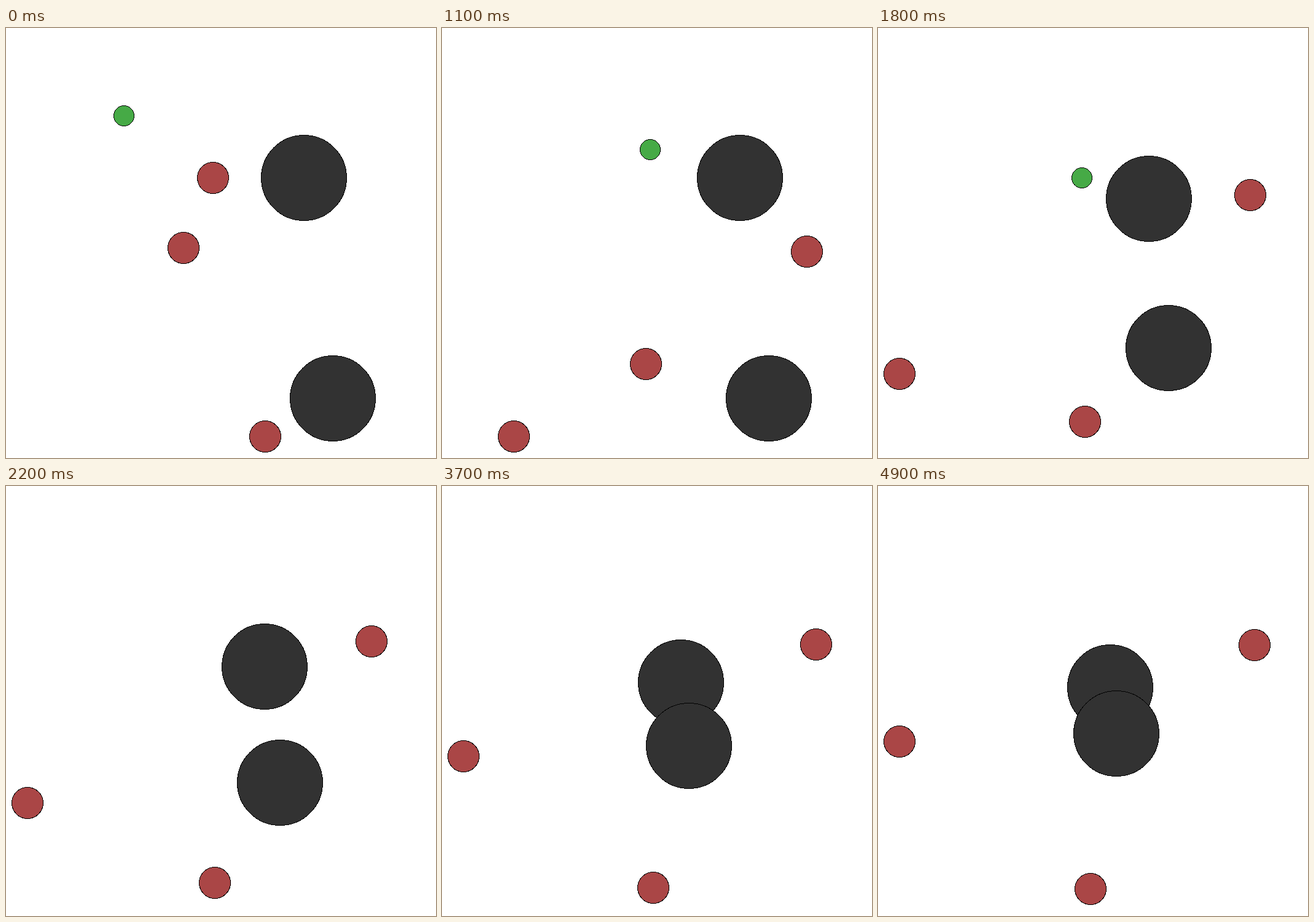
Recreate the animation shown at these times as an HTML page. Size 700x700 px, loop 5 s.

```html
<!DOCTYPE html>
<html>
<head>
<meta charset="utf-8">
<style>
html, body { margin: 0; width: 100%; height: 100%; overflow: hidden; background: #fff }
svg { display: block; width: 700px; height: 700px; shape-rendering: crispEdges }
circle { stroke: #000; stroke-width: 1 }
</style>
</head>
<body>
<svg id="stage" viewBox="0 0 700 700"></svg>
<script>
const STEP = 100, STEPS = 50, SETTLE = 13.5;
const MID = 350, LOW = 35, HIGH = 665;   // centre and walls of the field

// Waypoints are [step, x, y]; step Infinity is the resting place.
const big = (x, y) => ({ r: 69.5, fill: '#323232', path: [[SETTLE, x, y], [Infinity, MID, MID]] });
const red = path => ({ r: 25.5, fill: '#aa4646', path });

const discs = [
  big(485, 244),
  big(532, 603),
  red([[0, 337, 244], [11, 594, 364], [13, 638, 331], [15, 620, 296], [22, 595, 253], [Infinity, 625, 263]]),
  red([[0, 289, 358], [11, 332, 547], [SETTLE, 330.5, 630], [Infinity, MID, 663.5]]),
  red([[0, 422, HIGH], [11, 117, HIGH], [SETTLE, LOW, HIGH], [Infinity, LOW, MID]]),
  { r: 16.5, fill: '#46aa46', until: 18,
    path: [[0, 192, 143], [3, 238, 103], [6, 290, 125], [11, 339, 198], [15, 335, 224]] }
];

for (const d of discs) {
  d.el = document.createElementNS('http://www.w3.org/2000/svg', 'circle');
  d.el.setAttribute('r', d.r);
  d.el.setAttribute('fill', d.fill);
  stage.append(d.el);
}

// Discs speed up from rest, move evenly, then settle with distance falling as 1 / time.
function progress(a, b, n) {
  if (a < SETTLE) return ((n - a) / (b - a)) ** (a ? 1 : 1.65);
  const left = s => 1 / (s - 4.06);
  return (left(Math.max(a, n)) - left(a)) / (left(b) - left(a));
}

function place(path, n) {
  let i = 0;
  while (i < path.length - 2 && n >= path[i + 1][0]) i++;
  const [a, ax, ay] = path[i], [b, bx, by] = path[i + 1];
  const k = progress(a, b, n);
  return [ax + (bx - ax) * k, ay + (by - ay) * k].map(Math.round);
}

function draw(now) {
  const n = Math.floor(now / STEP) % STEPS;
  for (const d of discs) {
    const [x, y] = place(d.path, n);
    d.el.setAttribute('cx', x);
    d.el.setAttribute('cy', y);
    d.el.style.display = n > d.until ? 'none' : '';
  }
}

const start = performance.now();
function tick() {
  draw(performance.now() - start);
  requestAnimationFrame(tick);
}
tick();
</script>
</body>
</html>
```
